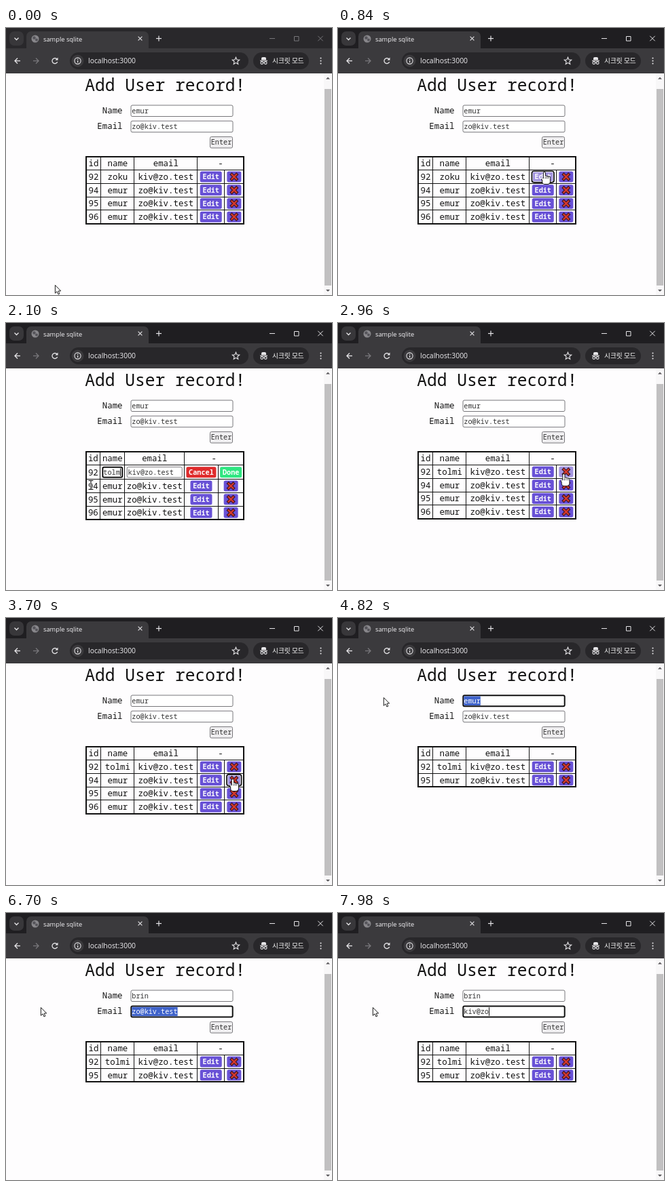
Recreate the animation shown at these times as an HTML page with a canvas. Size 480 by 394 pixels, loop 8 s.

```html
<!DOCTYPE html>
<html lang="ko">
<head>
<meta charset="utf-8">
<title>sample sqlite</title>
<style>
html, body { margin: 0; width: 100%; height: 100%; overflow: hidden; background: #fefdfe; }
canvas { display: block; width: 480px; height: 394px; }
</style>
</head>
<body>
<canvas id="stage"></canvas>
<script>
const LOOP = 8000, W = 480, H = 394;
const canvas = document.getElementById('stage');
const ctx = canvas.getContext('2d');
const dpr = window.devicePixelRatio || 1;
canvas.width = W * dpr;
canvas.height = H * dpr;

const MONO = '"Noto Sans Mono", "DejaVu Sans Mono", monospace';
const SANS = '"Open Sans", "Noto Sans", sans-serif';
const KOREAN = '"Noto Sans CJK KR", "Noto Sans CJK JP", "Noto Sans CJK", sans-serif';
const CELL = 12.4, FIELD = 10.2, STEP = FIELD * 0.6;
const INK = '#111', PALE = '#e6e5e8', BAR = '#3b3a3d', DARK = '#28272a';

const OLD_NAME = 'zoku', NEW_NAME = 'tolmi', USER = 'emur', NEXT_USER = 'brin';
const MAIL_A = 'kiv@zo.test', MAIL_B = 'zo@kiv.test';

// Event times in ms
const EDIT = 910, DONE = 2640, DELETE_94 = 3800, DELETE_96 = 4230;
const PICK_NAME = 1260, PICK_USER = 4570, TAB = 6250, PRESS = 120;

// Typing runs: first key, time between keys, final text
const RENAME = { from: 1720, gap: 115, word: NEW_NAME };
const NEW_USER = { from: 5250, gap: 155, word: NEXT_USER };
const NEW_MAIL = { from: 7020, gap: 165, word: MAIL_A.slice(0, 6) };

// Pointer moves: start, end, x, y; it rests in between
const HOME = { x: 72, y: 379 };
const MOVES = [
  [140, 700, 304, 213], [960, 1200, 169, 220], [1280, 1520, 125, 239],
  [2230, 2460, 332, 218], [2800, 3300, 334, 238], [3920, 4110, 335, 263],
  [4280, 4540, 214, 122], [4600, 4820, 67, 117], [4820, 4870, 16, 128], [4870, 4920, 51, 139]
];

let now = 0, mouse = HOME, kind = 'arrow';

function pointer() {
  let { x, y } = HOME;
  for (const [from, to, tx, ty] of MOVES) {
    const k = Math.min(1, Math.max(0, (now - from) / (to - from)));
    const ease = k * k * (3 - 2 * k);
    x += (tx - x) * ease;
    y += (ty - y) * ease;
  }
  return { x, y };
}

const within = (a, b) => now >= a && now < b;
const pressed = () => [EDIT, DONE, DELETE_94, DELETE_96].some(t => within(t - PRESS, t));

function keysOf({ from, gap, word }) {
  const n = Math.max(0, Math.min(word.length, Math.floor((now - from) / gap) + 1));
  return { n, value: word.slice(0, n), last: from + (n - 1) * gap };
}

function hover(x, y, w, h, shape) {
  const over = mouse.x >= x && mouse.x <= x + w && mouse.y >= y && mouse.y <= y + h;
  if (over) kind = shape;
  return over;
}

function text(s, x, y, size, { font = MONO, color = INK, align = 'left', weight = 400 } = {}) {
  ctx.font = `${weight} ${size}px ${font}`;
  ctx.fillStyle = color;
  ctx.textAlign = align;
  ctx.fillText(s, x, y);
}

function paint(fill, stroke, width = 1) {
  if (fill) { ctx.fillStyle = fill; ctx.fill(); }
  if (stroke) { ctx.strokeStyle = stroke; ctx.lineWidth = width; ctx.stroke(); }
}

function rect(x, y, w, h, color) {
  ctx.fillStyle = color;
  ctx.fillRect(x, y, w, h);
}

function box(x, y, w, h, r, ...style) {
  ctx.beginPath();
  ctx.roundRect(x, y, w, h, r);
  paint(...style);
}

function circle(x, y, r, ...style) {
  ctx.beginPath();
  ctx.arc(x, y, r, 0, 2 * Math.PI);
  paint(...style);
}

function line(color, width, ...pts) {
  ctx.beginPath();
  pts.forEach(p => ctx.lineTo(...p));
  paint(null, color, width);
}

function polygon(pts, ...style) {
  ctx.beginPath();
  pts.forEach(p => ctx.lineTo(...p));
  ctx.closePath();
  paint(...style);
}

function cross(x, y, r, color, width) {
  for (const s of [-1, 1]) line(color, width, [x - r, y - r * s], [x + r, y + r * s]);
}

function triangle(x, y, r, up) {
  polygon([[x - r, y + up * r / 2], [x + r, y + up * r / 2], [x, y - up * r / 2]], '#58575a');
}

function arrowIcon(x, dir, color) {
  const y = 48.5, r = 4;
  line(color, 1.3, [x - r * dir, y], [x + r * dir, y]);
  line(color, 1.3, [x, y - r], [x + r * dir, y], [x, y + r]);
}

function star(x, y, r) {
  const pts = Array.from({ length: 10 }, (_, i) => {
    const a = (i / 5 - 0.5) * Math.PI, d = i % 2 ? r * 0.45 : r;
    return [x + d * Math.cos(a), y + d * Math.sin(a)];
  });
  polygon(pts, null, PALE, 1.1);
}

function drawTitleBar() {
  // The window gains focus with the first press
  const active = now >= EDIT - PRESS;
  const ink = active ? PALE : '#77767a';
  rect(0, 0, W, 31, active ? '#1f1e21' : '#29282b');
  rect(0, 30, W, 37, BAR);
  box(5, 5, 21, 21, 7, '#38373a');
  line(PALE, 1.3, [12.5, 14.5], [15.5, 17.5], [18.5, 14.5]);
  box(30, 5, 180, 32, [7, 7, 0, 0], BAR);
  circle(43, 16, 5.5, '#88878b');
  circle(41.5, 14.5, 2.2, '#55545a');
  circle(45, 17.5, 2, '#55545a');
  text('sample sqlite', 55, 19.5, 9.3, { font: SANS, color: '#f4f3f6' });
  cross(197.5, 15.5, 2.9, PALE, 1.1);
  line(PALE, 1.2, [221, 15.5], [229, 15.5]);
  line(PALE, 1.2, [225, 11.5], [225, 19.5]);
  line(ink, 1, [388, 15.5], [396, 15.5]);
  box(424.5, 12.5, 6.5, 6.5, 0, null, ink);
  cross(463, 15.5, 3.7, ink, 1);
}

function drawToolbar() {
  arrowIcon(17, -1, PALE);
  arrowIcon(44, 1, '#78777b');
  ctx.beginPath();
  ctx.arc(72, 48.5, 4, 0.4, 5.6);
  paint(null, PALE, 1.3);
  polygon([[76.5, 43.5], [76.5, 47.5], [72.5, 47.5]], PALE);

  box(94, 36, 263, 25, 12.5, DARK);
  circle(105.5, 48.5, 9, BAR);
  circle(105.5, 48.5, 4.6, null, PALE, 1.1);
  rect(105, 48, 1.2, 3, PALE);
  rect(105, 45.8, 1.2, 1.2, PALE);
  text('localhost:3000', 121, 52, 10.4, { font: SANS, color: '#f0eff2' });
  star(338.5, 48.8, 5.5);

  box(364, 36, 82, 25, 12.5, DARK);
  box(376, 43, 7, 4.2, [2, 2, 0, 0], PALE);
  rect(374, 47.7, 11, 1.1, PALE);
  for (const x of [376.8, 382.2]) circle(x, 51.5, 1.9, null, PALE, 1.1);
  rect(378.6, 50.6, 1.8, 1, PALE);
  text('시크릿 모드', 392, 51.8, 9.7, { font: KOREAN, color: '#fff', weight: 500 });
  for (let i = -1; i <= 1; i++) circle(463.5, 48.5 + 4 * i, 1.05, PALE);
}

function drawScrollbar() {
  rect(468, 67, 12, 327, '#f8f7f8');
  rect(469, 90, 10, 290, '#c1c0c1');
  triangle(474, 74, 3, 1);
  triangle(474, 387.5, 3, -1);
}

// sel: selected range in characters; since: last time the caret moved
function field(x, y, w, h, value, { focus = false, sel = null, since = 0 } = {}) {
  hover(x, y, w, h, 'beam');
  if (focus) box(x + 0.8, y + 0.8, w - 1.6, h - 1.6, 2, '#fff', INK, 2);
  else box(x + 0.5, y + 0.5, w - 1, h - 1, 2, '#fff', '#77767a');
  const tx = x + 1.8 - Math.max(0, value.length * STEP - (w - 4.5));
  const base = y + h / 2 + 3.7;
  ctx.save();
  ctx.beginPath();
  ctx.rect(x + 1.5, y + 1, w - 3, h - 2);
  ctx.clip();
  text(value, tx, base, FIELD, { color: '#333' });
  if (focus && sel && sel[0] < sel[1]) {
    const sx = tx + sel[0] * STEP, sw = (sel[1] - sel[0]) * STEP;
    rect(sx, y + 2, sw, h - 4, '#3f63cb');
    ctx.beginPath();
    ctx.rect(sx, y, sw, h);
    ctx.clip();
    text(value, tx, base, FIELD, { color: '#fff' });
  } else if (focus && (now - since) % 1060 < 530) {
    rect(Math.round(tx + value.length * STEP), y + 2.5, 1, h - 5, INK);
  }
  ctx.restore();
}

// Selection dragged from the end of a value towards the pointer
function dragged(value, x) {
  const at = Math.round((mouse.x - x - 2) / STEP);
  return [Math.max(0, Math.min(value.length, at)), value.length];
}

// A field whose selected old value is typed over
function typedField(x, y, w, h, old, run, focus, sel, since) {
  const { n, value, last } = keysOf(run);
  if (n) field(x, y, w, h, value, { focus, since: last });
  else field(x, y, w, h, old, { focus, sel, since });
}

function button(cx, cy, w, color, hot, label) {
  const x = cx - w / 2, y = cy - 8;
  const over = hover(x, y, w, 16, 'hand');
  box(x, y, w, 16, 2.5, over ? hot : color);
  if (over && pressed()) {
    box(x + 0.8, y + 0.8, w - 1.6, 14.4, 2, null, '#fff');
    box(x - 0.3, y - 0.3, w + 0.6, 16.6, 3, null, INK, 1.7);
  }
  if (label) {
    text(label, cx, cy + 3.7, FIELD, { color: '#fff', align: 'center', weight: 700 });
  } else {
    cross(cx, cy, 5, '#3a1523', 4.6);
    cross(cx, cy, 4.2, '#d3382c', 2.4);
  }
}

function drawForm() {
  text('Add User record!', 234.3, 93.4, 24.6, { align: 'center' });
  text('Name', 171.5, 126, CELL, { align: 'right' });
  text('Email', 171.5, 149.3, CELL, { align: 'right' });
  const x = 183.5, w = 151, h = 17.5;
  typedField(x, 113.5, w, h, USER, NEW_USER, within(PICK_USER, TAB), dragged(USER, x), PICK_USER);
  typedField(x, 136.7, w, h, MAIL_B, NEW_MAIL, now >= TAB, [0, MAIL_B.length], TAB);
  box(300.5, 160.5, 33, 16.5, 2, '#efeef0', '#77767a');
  text('Enter', 317, 172.4, FIELD, { align: 'center', color: '#333' });
}

function cell(s, cx, cy) {
  const w = s.length * CELL * 0.6;
  hover(cx - w / 2, cy - 8, w, 16, 'beam');
  text(s, cx, cy + 4.5, CELL, { align: 'center' });
}

// Column edges: padded contents stretched to the table width
function columns(left, width, contents) {
  const pad = 5.7, total = contents.reduce((sum, c) => sum + c + pad, 0);
  let x = left;
  return [left, ...contents.map(c => x += (c + pad) * width / total)];
}

function editRow(mid, cy) {
  const y = cy - 8.2, h = 16.5, w = 30.5, mailW = 82;
  const x = mid(1) - w / 2;
  typedField(x, y, w, h, OLD_NAME, RENAME, within(PICK_NAME, DONE - PRESS), dragged(OLD_NAME, x), PICK_NAME);
  field(mid(2) - mailW / 2, y, mailW, h, MAIL_A);
  button(mid(3), cy, 44, '#df2b2c', '#ee7a7a', 'Cancel');
  button(mid(4), cy, 32, '#2fe681', '#86f0b4', 'Done');
}

function drawTable() {
  const left = 118, top = 190, width = 232, pitch = 19.7;
  const editing = within(EDIT, DONE);
  const cols = columns(left, width, editing ? [15, 30.5, 82, 44, 32] : [15, 40.5, 82, 32, 21]);
  const mid = i => (cols[i] + cols[i + 1]) / 2;
  const edge = i => top + i * pitch + (editing && i > 1 ? 1.2 : 0);
  const snap = v => Math.floor(v) + 0.5;

  const rows = [['92', now < DONE ? OLD_NAME : NEW_NAME, MAIL_A]];
  if (now < DELETE_94) rows.push(['94', USER, MAIL_B]);
  rows.push(['95', USER, MAIL_B]);
  if (now < DELETE_96) rows.push(['96', USER, MAIL_B]);

  const bottom = Math.round(edge(rows.length + 1) + 0.1);
  for (let i = 1; i <= rows.length; i++) {
    line(INK, 1, [left, snap(edge(i))], [left + width, snap(edge(i))]);
  }
  for (let i = 1; i < 5; i++) {
    line(INK, 1, [snap(cols[i]), i === 4 ? edge(1) : top], [snap(cols[i]), bottom]);
  }
  box(left, top, width, bottom - top, 0, null, INK, 2);

  const head = (edge(0) + edge(1)) / 2;
  ['id', 'name', 'email'].forEach((s, i) => cell(s, mid(i), head));
  cell('-', (cols[3] + cols[5]) / 2, head);

  rows.forEach(([id, name, mail], i) => {
    const cy = (edge(i + 1) + edge(i + 2)) / 2;
    cell(id, mid(0), cy);
    if (editing && i === 0) return editRow(mid, cy);
    cell(name, mid(1), cy);
    cell(mail, mid(2), cy);
    button(mid(3), cy, 32, '#6851d6', '#a294df', 'Edit');
    button(mid(4), cy, 21, '#6851d6', '#a294df');
  });
}

function beam() {
  for (const [color, width] of [['#fff', 2.6], [INK, 1.1]]) {
    line(color, width, [0, -6], [0, 6]);
    for (const y of [-6.5, 6.5]) line(color, width, [-3.5, y], [3.5, y]);
  }
}

function hand() {
  const shape = (...style) => {
    box(-2.8, 8.5, 10.4, 8.5, 3, ...style);
    for (let i = 0; i < 4; i++) box(-1.2 + 2.3 * i, i ? 4.7 + 0.6 * i : 0, 2.2, 9, 1.1, ...style);
    line(style[1] || style[0], style[1] ? 4 : 2, [-3.4, 9], [-1, 12.5]);
  };
  shape(null, INK, 1.8);
  shape('#fff');
  for (let i = 1; i < 4; i++) rect(-1.4 + 2.3 * i, 6.5, 0.6, 3, INK);
}

function arrow() {
  const tip = [[0.4, 0.5], [0.4, 12.3], [3.1, 9.8], [5, 14], [6.9, 13.1], [5.1, 9.1], [8.7, 9]];
  polygon(tip, '#fff', INK, 0.95);
}

function drawPointer() {
  ctx.save();
  ctx.translate(mouse.x, mouse.y);
  ({ beam, hand, arrow })[kind]();
  ctx.restore();
}

function render(t) {
  now = t;
  mouse = pointer();
  kind = 'arrow';
  ctx.setTransform(dpr, 0, 0, dpr, 0, 0);
  rect(0, 0, W, H, '#fefdfe');
  drawTitleBar();
  drawToolbar();
  drawScrollbar();
  drawForm();
  drawTable();
  drawPointer();
}

const start = performance.now();
function tick() {
  render((performance.now() - start) % LOOP);
  requestAnimationFrame(tick);
}
tick();
</script>
</body>
</html>
```
